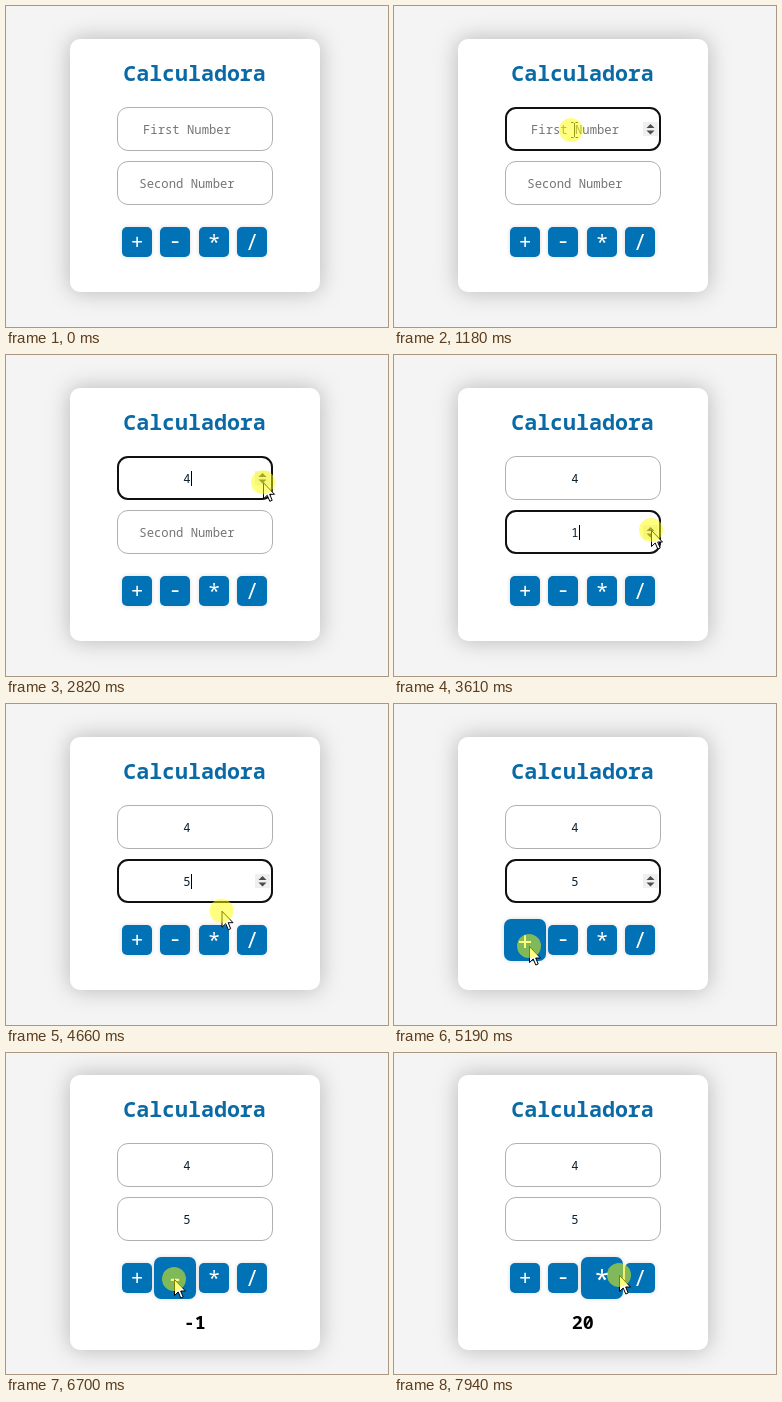
Animation of 382 by 321 pixels, one loop 8000 ms. Source, as an HTML page:

```html
<!DOCTYPE html>
<html lang="es">
<head>
<meta charset="utf-8">
<title>Calculadora</title>
<style>
  html, body { margin: 0; width: 100%; height: 100%; overflow: hidden; background: #f4f4f4; }
  svg { display: block; width: 100%; height: 100%; }
  text { font-family: "Noto Sans Mono", "DejaVu Sans Mono", monospace; text-anchor: middle; }
  #card { fill: #fff; filter: drop-shadow(0 0 11px rgba(0, 0, 0, .25)); }
  #title { font-size: 21.6px; font-weight: 600; fill: #0a6aa6; }
  .field text { font-size: 12.22px; }
  .button { filter: drop-shadow(0 0 2px rgba(0, 0, 0, .15)); }
  .button rect { fill: #0072b5; }
  .button text { font-size: 22px; font-weight: 500; fill: #fff; }
  #result { font-size: 18.33px; font-weight: 600; fill: #000; }
</style>
</head>
<body>
<svg viewBox="0 0 382 321" xmlns="http://www.w3.org/2000/svg">
  <rect width="382" height="321" fill="#f4f4f4"/>
  <rect id="card" x="64" width="250" rx="10"/>
  <g id="content">
    <text id="title" x="188.5" y="75">Calculadora</text>
    <g id="fields"></g>
    <g id="buttons"></g>
    <text id="result" x="188.7" y="287"></text>
  </g>
  <g id="cursor">
    <path id="arrow" d="M.5 .5V16.5L4.2 13L6.8 19L9.2 18L6.7 12H11.5Z" fill="#fff" stroke="#000"/>
    <path id="beam" d="M0 -7.5H2.5M4.5 -7.5H7M3.5 -7V7M0 7.5H2.5M4.5 7.5H7" fill="none" stroke="#333"/>
    <circle r="12" fill="#ff0" fill-opacity=".5"/>
  </g>
</svg>
<script>
const LOOP = 8000;
const STEP = 66;
const START = 460;
const SHIFT_AT = 5320;
const HOVER_MS = 300;
const BLINK_MS = 500;

const $ = id => document.getElementById(id);

function make(tag, parent, attrs = {}) {
  const node = document.createElementNS("http://www.w3.org/2000/svg", tag);
  set(node, attrs);
  parent.appendChild(node);
  return node;
}

function set(node, attrs) {
  for (const key in attrs) node.setAttribute(key, attrs[key]);
}

function show(node, visible) {
  node.style.display = visible ? "" : "none";
}

const clamp = v => Math.max(0, Math.min(1, v));
const smooth = v => v * v * (3 - 2 * v);
const easeOut = v => 1 - (1 - v) ** 2;

// Each move eases from the previous resting point; sag bends it downwards.
const origin = { x: 227, y: 294 };
const moves = [
  { from: 440, to: 1110, x: 177, y: 124 },
  { from: 1290, to: 1720, x: 257, y: 118 },
  { from: 2680, to: 3160, x: 257, y: 175 },
  { from: 4420, to: 5010, x: 135, y: 242, sag: 10 },
  { from: 5920, to: 6500, x: 168, y: 226 },
  { from: 7030, to: 7650, x: 217, y: 222 },
  { from: 7860, to: 7950, x: 225, y: 222 }
];

function pointer(t) {
  let { x, y } = origin;
  for (const m of moves) {
    const k = smooth(clamp((t - m.from) / (m.to - m.from)));
    x += (m.x - x) * k;
    y += (m.y - y) * k + (m.sag || 0) * 4 * k * (1 - k);
    if (k < 1) break;
  }
  return { x, y };
}

// The spinner counts to 1 at `first`, then on from `next` every `gap` ms.
const fields = [
  { y: 101, hint: "First Number", hover: 980, focus: 1110, blur: 3550,
    first: 1720, next: 2170, gap: 135, max: 4 },
  { y: 155, hint: "Second Number", hover: 3010, focus: 3550, blur: SHIFT_AT,
    first: 3550, next: 3715, gap: 165, max: 5 }
];

for (const f of fields) {
  const g = make("g", $("fields"), { class: "field", transform: `translate(0 ${f.y})` });
  f.box = make("rect", g, { fill: "#fff" });
  f.text = make("text", g, { x: 181, y: 27 });
  f.caret = make("rect", g, { x: 185, y: 15, width: 1, height: 15, fill: "#000" });
  f.spinner = make("g", g);
  make("rect", f.spinner, { x: 249, y: 15, width: 15, height: 14, fill: "#efefef" });
  make("path", f.spinner, { d: "M252.5 21L256.5 17L260.5 21ZM252.5 23.5L256.5 27.5L260.5 23.5Z", fill: "#4a4a4a" });
}

function count(f, t) {
  if (t < f.first) return 0;
  const more = t < f.next ? 0 : 1 + Math.floor((t - f.next) / f.gap);
  return Math.min(f.max, 1 + more);
}

function drawField(f, t) {
  const focused = t >= f.focus && t < f.blur;
  const value = count(f, t);
  const w = focused ? 2 : 1;
  set(f.box, {
    x: 111 + w / 2, y: w / 2, width: 156 - w, height: 44 - w, rx: 11 - w / 2,
    stroke: focused ? "#101010" : "#b0b0b0", "stroke-width": w
  });
  f.text.textContent = value || f.hint;
  set(f.text, { fill: value ? "#0b2030" : "#757575", "font-weight": value ? 500 : 400 });
  const idle = Math.max(0, t - f.next - (f.max - 2) * f.gap);
  show(f.caret, focused && value && Math.floor(idle / BLINK_MS) % 2 === 0);
  show(f.spinner, t >= f.hover && t < f.blur);
}

// `enter` is when the pointer arrives; it leaves on reaching the next button.
const buttons = [
  { sign: "+", drop: 8.2, enter: 4820, result: "9", click: SHIFT_AT },
  { sign: "-", drop: 6.2, enter: 6180, result: "-1", click: 6570 },
  { sign: "*", drop: 8.7, enter: 7220, result: "20", click: 7700 },
  { sign: "/", drop: 8, enter: LOOP }
];

buttons.forEach((b, i) => {
  const x = Math.round(131 + 38.4 * i);
  const g = make("g", $("buttons"), { class: "button", transform: `translate(${x} 236)` });
  b.leave = i + 1 < buttons.length ? buttons[i + 1].enter : LOOP;
  b.face = make("rect", g, { x: -15, y: -15, width: 30, height: 30, rx: 5 });
  b.label = make("text", g, { y: b.drop });
  b.label.textContent = b.sign;
});

function drawButton(b, t) {
  const grow = easeOut(clamp((t - b.enter) / HOVER_MS)) - easeOut(clamp((t - b.leave) / HOVER_MS));
  b.face.setAttribute("transform", `scale(${1 + .4 * grow})`);
  b.label.setAttribute("transform", `translate(0 ${grow}) scale(${1 + .25 * grow})`);
}

function draw(t) {
  const shifted = t >= SHIFT_AT;
  set($("card"), { y: shifted ? 22 : 33, height: shifted ? 275 : 253 });
  $("content").setAttribute("transform", `translate(0 ${shifted ? -11 : 0})`);
  const clicked = buttons.filter(b => t >= b.click).pop();
  $("result").textContent = clicked ? clicked.result : "";
  fields.forEach(f => drawField(f, t));
  buttons.forEach(b => drawButton(b, t));

  const { x, y } = pointer(t);
  const inText = !shifted && x < 249 && fields.some(f => y > f.y && y < f.y + 44);
  $("cursor").setAttribute("transform", `translate(${x.toFixed(1)} ${y.toFixed(1)})`);
  show($("cursor"), t >= START);
  show($("arrow"), !inText);
  show($("beam"), inText);
}

function frame(now) {
  const t = now % LOOP;
  // The picture advances in short held steps.
  draw(t < START ? t : START + (Math.floor((t - START) / STEP) + .5) * STEP);
  requestAnimationFrame(frame);
}

draw(0);
requestAnimationFrame(frame);
</script>
</body>
</html>
```
